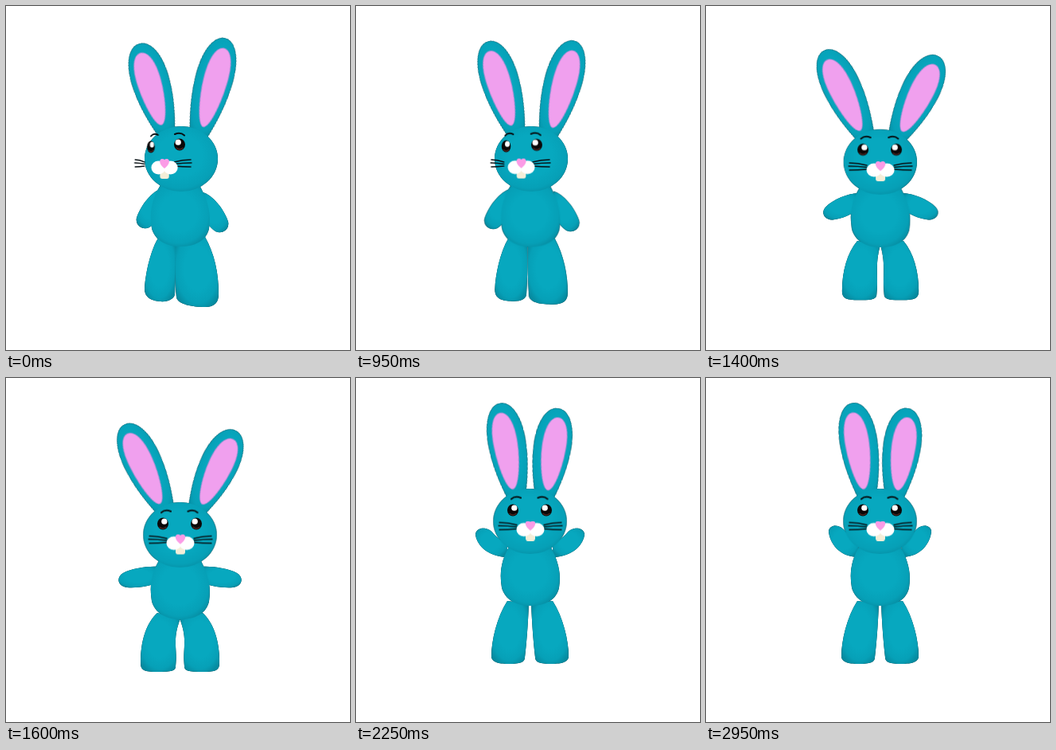
An HTML page without scripts for the animation above (3000 ms loop, 432 by 432 pixels).

```html
<!DOCTYPE html>
<html lang="en">
<head>
<meta charset="utf-8">
<title>Waving rabbit</title>
<style>
html, body { margin: 0; width: 100%; height: 100%; overflow: hidden; background: #fff; }
svg { display: block; width: 100vw; height: 100vh; }

/* Poses: a side view, b front, p ear swing, c squat, d hop, e and f waving */
@keyframes pose {
  0%, 25% { transform: var(--a); }
  40% { transform: var(--b); }
  50% { transform: var(--p, var(--c)); }
  53.33% { transform: var(--c); }
  60% { transform: var(--d); }
  75% { transform: var(--e); }
  98.33%, 100% { transform: var(--f); }
}
@keyframes turn {
  0%, 25% { transform: var(--a); }
  40% { transform: var(--b); }
  53.33%, 100% { transform: var(--c); }
}
@keyframes shape {
  0%, 25% { d: var(--a); }
  40% { d: var(--b); }
  51%, 53.33% { d: var(--c); }
  60% { d: var(--d); }
  75% { d: var(--e); }
  82% { d: var(--f); }
  89% { d: var(--e); }
  98.33%, 100% { d: var(--f); }
}
.pose { animation: pose 3s ease-in-out infinite; }
.turn { animation: turn 3s ease-in-out infinite; }
.shape { animation: shape 3s ease-in-out infinite; }

.fur { fill: url(#fur); filter: drop-shadow(0 0 .55px #00252b); }
.pink { fill: #f0a0ee; stroke: #b58bd4; stroke-width: .8; }
.line { fill: none; stroke: #081014; stroke-linecap: round; }

.head {
  --a: translate(220px, 192px);
  --b: translate(220px, 192px);
  --c: translate(218.5px, 197px);
  --d: translate(218.5px, 184px);
  --e: translate(218.5px, 180px);
  --f: translate(218.5px, 180px);
}
.body {
  --a: translate(-1px, -1px);
  --b: translate(0, 0);
  --c: translate(-1px, 0);
  --d: translate(-1px, -12px);
  --e: translate(-1px, -17px);
  --f: translate(-1px, -17px);
}
.ear-l {
  --a: translate(200px, 155px) rotate(-17deg) scale(1, .97);
  --b: translate(200px, 157px) rotate(-17.5deg) scale(1, 1.05);
  --p: translate(199px, 163px) rotate(-28deg) scale(1, 1);
  --c: translate(199px, 163px) rotate(-25.5deg) scale(1, 1);
  --d: translate(200px, 151px) rotate(-12.5deg) scale(1, 1.01);
  --e: translate(201px, 146px) rotate(-10deg) scale(1, 1);
  --f: translate(202px, 146px) rotate(-9deg) scale(1, 1);
}
.ear-r {
  --a: translate(243px, 158px) rotate(15.5deg) scale(-1, 1.05);
  --b: translate(241px, 160px) rotate(16deg) scale(-1, 1);
  --p: translate(241px, 163px) rotate(30deg) scale(-1, .95);
  --c: translate(241px, 163px) rotate(26deg) scale(-1, .93);
  --d: translate(239px, 153px) rotate(12.5deg) scale(-1, .96);
  --e: translate(237px, 147px) rotate(9deg) scale(-1, .95);
  --f: translate(237px, 147px) rotate(8.5deg) scale(-1, .95);
}

.arm-l { --a: translate(6px, -2px); --b: translate(0, 0); --c: translate(0, 0); }
.arm-r {
  --a: translate(437px, 3px) scale(-1, 1);
  --b: translate(440px, 0) scale(-1, 1);
  --c: translate(437px, 0) scale(-1, 1);
}
.arm {
  --a: path("M190 231C178 234 163 252 158 268C156 278 166 284 174 280C182 275 190 262 194 250Z");
  --b: path("M190 231C178 234 163 252 158 268C156 278 166 284 174 280C182 275 190 262 194 250Z");
  --c: path("M192 237C178 236 158 239 147 245C138 250 140 262 152 263C166 264 180 261 192 257Z");
  --d: path("M190 212C182 210 177 206 172 201C166 192 152 191 150 201C150 213 162 229 190 230Z");
  --e: path("M190 207C183 205 178 201 173 196C167 187 152 186 150 196C151 208 163 224 190 225Z");
  --f: path("M192 206C184 204 180 199 176 194C169 183 156 183 154 192C155 206 166 224 190 225Z");
}

.leg-r {
  --a: translate(437px, 0) scale(-1, 1);
  --b: translate(439px, 0) scale(-1, 1);
  --c: translate(437px, 0) scale(-1, 1);
}
.leg {
  --a: path("M192 290C182 305 175 335 174 355C174 367 184 370 193 371C203 372 211 368 212 362C213 340 213 320 213 295Z");
  --b: path("M190 295C180 315 175 340 175 358C175 368 182 370 195 370C210 371 217 369 217 362C219 340 219 320 219 295Z");
  --c: path("M190 295C176 308 169 330 169 358C169 367 174 369 190 369C208 369 213 368 213 362C216 340 208 330 219 302Z");
  --d: path("M190 285C178 305 173 335 173 354C174 364 184 366 195 366C210 366 216 364 216 358C218 335 218 310 218 285Z");
  --e: path("M190 280C177 300 170 330 170 350C171 358 182 359 192 359C206 359 212 357 212 351C214 335 216 310 217 283Z");
  --f: path("M190 280C177 300 170 330 170 350C171 358 182 359 192 359C206 359 212 357 212 351C214 335 216 310 217 283Z");
}
.leg-r .leg {
  --a: path("M187 290C175 312 170 335 170 362C170 372 175 378 187 378C202 378 221 375 223 366C225 345 225 325 224 298Z");
}

.eye-l { --a: translate(-38px, -15px) scale(.7, 1); --b: translate(-22px, -17px) scale(1, 1); --c: translate(-21.5px, -14px) scale(1, 1); }
.eye-r { --a: translate(-2px, -18px) scale(-1, 1); --b: translate(20px, -17px) scale(-1, 1); --c: translate(20.5px, -14px) scale(-1, 1); }
.brow-l { --a: translate(-33.5px, -30px) scale(.75, 1); --b: translate(-19px, -32px) scale(1, 1); --c: translate(-17.5px, -29.5px) scale(1, 1); }
.brow-r { --a: translate(-2px, -31px) scale(-1, 1); --b: translate(17px, -32px) scale(-1, 1); --c: translate(16px, -29.5px) scale(-1, 1); }
.snout { --a: translate(-21px, 10px) scale(.95, 1); --b: translate(0, 9px) scale(1, 1); --c: translate(.5px, 9.5px) scale(1, 1); }
.hair-l { --a: translate(-36.6px, 9px) scale(.55, 1); --b: translate(0, 9px) scale(1, 1); --c: translate(.5px, 9.5px) scale(1, 1); }
.hair-r { --a: translate(-25px, 9px) scale(-.95, 1); --b: translate(0, 9px) scale(-1, 1); --c: translate(.5px, 9.5px) scale(-1, 1); }
</style>
</head>
<body>
<svg viewBox="0 0 432 432">
  <defs>
    <radialGradient id="fur" cx=".48" cy=".45" r=".62">
      <stop offset=".5" stop-color="#07a8bf"/>
      <stop offset=".8" stop-color="#06a0b7"/>
      <stop offset="1" stop-color="#068a9f"/>
    </radialGradient>
    <g id="ear">
      <path d="M-11 5C-17 -15 -23.500 -40 -23.500 -68C-23.500 -98 -13 -116 0 -116C13 -116 23.500 -98 23.500 -68C23.500 -40 17 -15 11 5Z"/>
      <path class="pink" d="M-3 -7C-11 -8 -17 -42 -17 -68C-17 -90 -11 -104 -2 -104C7 -104 13 -90 13 -68C13 -42 5 -6 -3 -7Z"/>
    </g>
    <g id="eye">
      <ellipse rx="7" ry="7.500" fill="#0b0808"/>
      <path d="M-4.500 4Q0 8 4.500 4" fill="none" stroke="#4a2520" stroke-width="1.300"/>
      <circle cx="1.800" cy="-2.800" r="3.600" fill="#fff"/>
    </g>
    <path id="brow" class="line" d="M-6 1.500Q-1 -3 6 0" stroke-width="2.100"/>
    <path id="hair" class="line" d="M-17 -5Q-28 -8 -39 -8M-17 -2.500Q-28 -4 -40 -4M-17 0Q-28 1 -39 1" stroke-width="1.300"/>
  </defs>

  <g class="fur">
    <g class="pose ear-l"><use href="#ear"/></g>
    <g class="pose ear-r"><use href="#ear"/></g>
    <path class="shape leg"/>
    <g class="turn leg-r"><path class="shape leg"/></g>
    <g class="turn arm-l"><path class="shape arm"/></g>
    <g class="turn arm-r"><path class="shape arm"/></g>
    <path class="pose body" d="M195 226C183 245 181 262 184 280C188 296 203 303 220 303C238 303 253 296 256 280C259 260 254 245 244 226Z"/>
    <ellipse class="pose head" rx="46" ry="41"/>
  </g>

  <g class="pose head">
    <g class="turn eye-l"><use href="#eye"/></g>
    <g class="turn eye-r"><use href="#eye"/></g>
    <g class="turn brow-l"><use href="#brow"/></g>
    <g class="turn brow-r"><use href="#brow"/></g>
    <g class="turn hair-l"><use href="#hair"/></g>
    <g class="turn hair-r"><use href="#hair"/></g>
    <g class="turn snout">
      <rect x="-6" y="5" width="12" height="10" rx="3" fill="#f4eed8"/>
      <g fill="#fff">
        <ellipse cx="-8" cy="1" rx="9.500" ry="8.500"/>
        <ellipse cx="8" cy="1" rx="9.500" ry="8.500"/>
      </g>
      <path d="M0 2C-3 0 -7 -4 -6 -8C-5 -11 -1 -10 0 -9C1 -10 5 -11 6 -8C7 -4 3 0 0 2Z" fill="#fb9ce6"/>
    </g>
  </g>
</svg>
</body>
</html>
```
